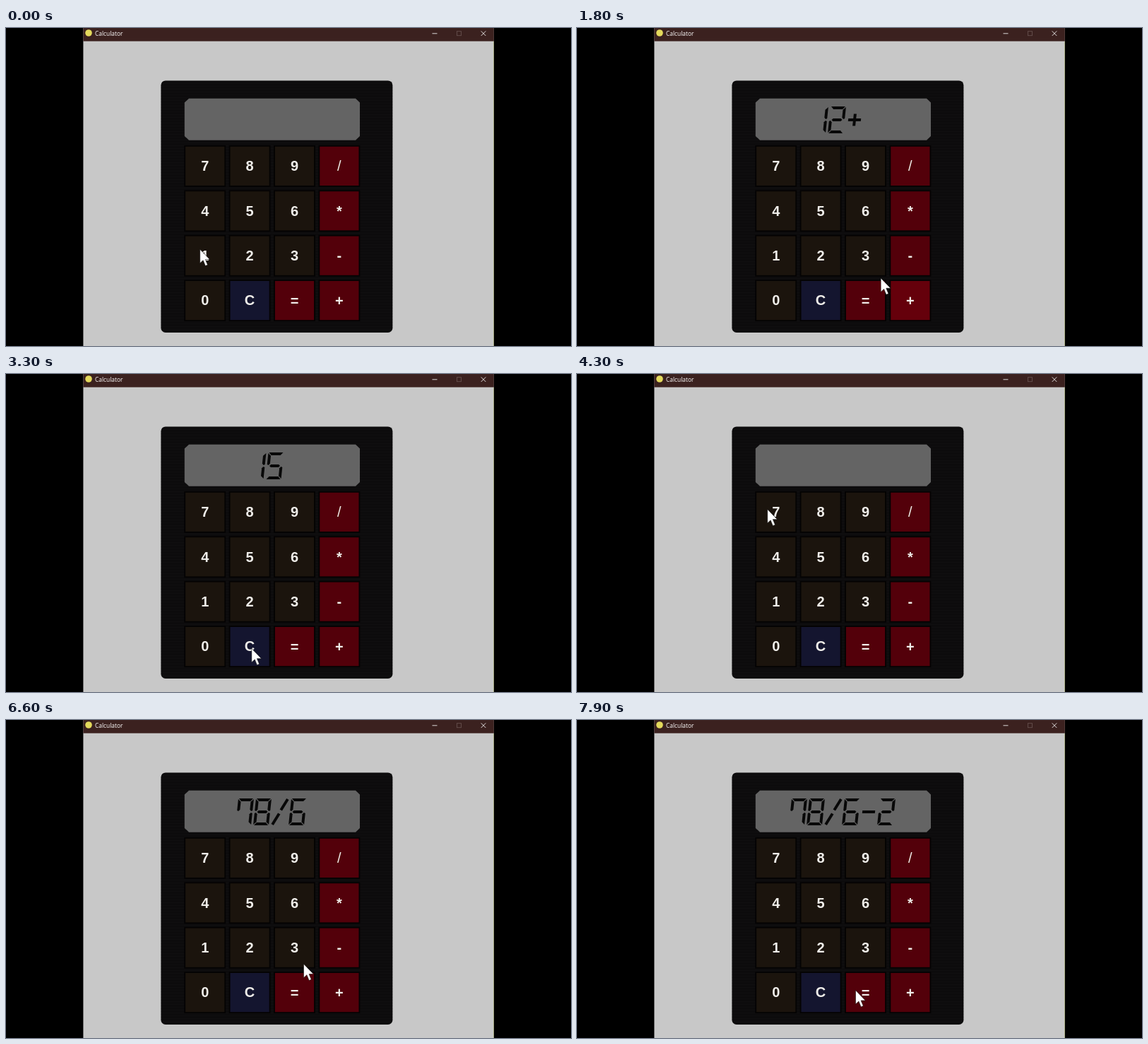
An HTML page for the animation above (8 s loop, 800 by 450 pixels).

```html
<!DOCTYPE html>
<html lang="en">
<head>
<meta charset="utf-8">
<title>Calculator</title>
<style>
html, body { margin: 0; width: 100%; height: 100%; overflow: hidden; background: #000; }
svg { display: block; width: 800px; height: 450px; }
.key { font: bold 20px "Liberation Sans", Arial, sans-serif; fill: #f0eeea; text-anchor: middle; }
.title { font: 8.4px "Open Sans", sans-serif; fill: #fff; }
</style>
</head>
<body>
<svg viewBox="0 0 800 450">
  <defs>
    <pattern id="ribs" width="8" height="4" patternUnits="userSpaceOnUse">
      <rect width="8" height="1" fill="#000" opacity=".2"/>
    </pattern>
  </defs>
  <rect width="800" height="450"/>
  <rect x="109.4" width="581.4" height="450" fill="#c8c8c8"/>
  <rect x="109.4" width="581.4" height="18.7" fill="#3b211f"/>
  <rect x="690" y="19" width="1" height="431" fill="#a9ad86"/>
  <circle cx="117" cy="7" r="4.8" fill="#e3d95c"/>
  <text class="title" x="126" y="10.5">Calculator</text>
  <g fill="none" stroke="#eee" stroke-width=".9">
    <path d="M603.5 7.8h7"/>
    <rect x="638.5" y="4.7" width="6" height="6" stroke="#66504e"/>
    <path d="M672.7 4.4l6.6 6.600m0-6.600l-6.600 6.600"/>
  </g>
  <rect x="219.400" y="74.400" width="328" height="356.600" rx="6.500" fill="#0e0d0e"/>
  <rect x="219.400" y="74.400" width="328" height="356.600" rx="6.500" fill="url(#ribs)"/>
  <path d="M259 99.800H495L501 105.500V153L495 158.800H259L252.800 153V105.500Z" fill="#646464"/>
  <g id="display"></g>
  <g id="keys"></g>
  <path id="cursor" d="M0 0V19.500L4.400 15.500L7.600 23.300L10.800 22L7.600 14.300H13.800Z"
        fill="#fff" stroke="#000" stroke-width=".5"/>
</svg>
<script>
const LOOP = 8000, STEP = 100;
const MOVE = 400, SETTLE = 200, HOLD = 200;
const INK = '#080808';
const $ = id => document.getElementById(id);

function add(parent, tag, attrs, text) {
  const node = document.createElementNS('http://www.w3.org/2000/svg', tag);
  for (const name in attrs) node.setAttribute(name, attrs[name]);
  if (text) node.textContent = text;
  parent.append(node);
  return node;
}

// Keypad: [normal, pressed] colours
const BROWN = ['#1b140d', '#261d14'], RED = ['#53000a', '#65000b'], BLUE = ['#14152f', '#1d1e42'];
const PITCH = 63.4, SIZE = 57;
const keys = {};
[...'789/456*123-0C=+'].forEach((label, i) => {
  const cx = 281.7 + (i % 4) * PITCH, cy = 195.4 + Math.floor(i / 4) * PITCH;
  const colors = label === 'C' ? BLUE : /\d/.test(label) ? BROWN : RED;
  const face = add($('keys'), 'rect', {
    x: cx - SIZE / 2, y: cy - SIZE / 2, width: SIZE, height: SIZE, stroke: '#040303', 'stroke-width': 1.8
  });
  add($('keys'), 'text', {
    class: 'key', x: cx, y: cy + (/[=+]/.test(label) ? 7.8 : 6.8),
    style: label === '/' ? 'font-weight: normal' : ''
  }, label);
  keys[label] = { face, colors, cx, cy };
});

// Three bar shapes around the glyph centre; the other segments are mirror images
const CAP = 'M-10 -19H10L6.500 -15H-6.500Z';
const SIDE = 'M-11 -18V-2L-9 -1L-7 -3.300V-14.300Z';
const MIDDLE = 'M-7.500 0l2-2h11l2 2-2 2h-11z';
const SEGMENTS = {
  a: [CAP, 1, 1], d: [CAP, 1, -1], g: [MIDDLE, 1, 1],
  f: [SIDE, 1, 1], b: [SIDE, -1, 1], e: [SIDE, 1, -1], c: [SIDE, -1, -1]
};
const DIGITS = 'abcdef bc abged abgcd fgbc afgcd afgedc fabc abcdefg abcdfg'.split(' ');
const SIGNS = { '/': 'M-9 18L-1 2.500M1 -2.500L9 -18', '+': 'M-9 0H9M0 -8.500V8.500', '-': 'M-9 0H9' };
const advance = ch => ch === '1' ? 10 : 25;

function showText(text) {
  $('display').replaceChildren();
  let right = 377 - [...text].reduce((sum, ch) => sum + advance(ch), 0) / 2;
  for (const ch of text) {
    right += advance(ch);
    const glyph = add($('display'), 'g', { transform: `translate(${right - 14} 130) skewX(-6)` });
    if (SIGNS[ch]) {
      add(glyph, 'path', { d: SIGNS[ch], stroke: INK, 'stroke-width': 4 });
      continue;
    }
    for (const name of DIGITS[ch]) {
      const [d, sx, sy] = SEGMENTS[name];
      add(glyph, 'path', { d, fill: INK, transform: `scale(${sx} ${sy})` });
    }
  }
}

// Where the pointer goes: arrival time, key, offset from the key's centre
const stop = (time, key, dx = -10, dy = 0, hover = false) =>
  ({ time, key, x: keys[key].cx + dx, y: keys[key].cy + dy, hover });
const STOPS = [
  stop(-100, '1', -7, -9), stop(700, '2', 27, -2), stop(1500, '+'), stop(2000, '3'),
  stop(2500, '=', 8, 18), stop(3400, 'C'), stop(4300, '7', -12, -4), stop(4800, '8'),
  stop(5300, '/', -11, 3), stop(5800, '6'), stop(6600, '3', 13, 23, true),
  stop(6900, '-'), stop(7300, '2'), stop(7900, '=', -14, -3)
];

function cursorAt(t) {
  const arrived = STOPS.filter(s => s.time <= t);
  const from = arrived.at(-1), to = STOPS[arrived.length] || from;
  const begin = Math.max(from.time, to.time - MOVE);
  const k = Math.max(0, (t - begin) / (to.time - begin || 1));
  const ease = to === from ? 0 : k * k * (3 - 2 * k);
  return [from.x + (to.x - from.x) * ease, from.y + (to.y - from.y) * ease];
}

function type(text, key) {
  if (key === 'C') return '';
  if (key === '=') return String(text.split('+').reduce((sum, n) => sum + Number(n), 0));
  return text + key;
}

let shown = '';
function render(time) {
  const t = Math.floor(time % LOOP / STEP) * STEP;
  const pressed = STOPS.filter(s => !s.hover && s.time + SETTLE <= t);
  const text = pressed.reduce((so_far, s) => type(so_far, s.key), '');
  if (text !== shown) showText(shown = text);

  const last = pressed.at(-1);
  const held = last && t < last.time + SETTLE + HOLD ? last.key : null;
  for (const label in keys) {
    const { face, colors } = keys[label];
    face.setAttribute('fill', colors[label === held ? 1 : 0]);
  }
  $('cursor').setAttribute('transform', `translate(${cursorAt(t)})`);
}

const start = performance.now();
function tick() {
  render(performance.now() - start);
  requestAnimationFrame(tick);
}
tick();
</script>
</body>
</html>
```
